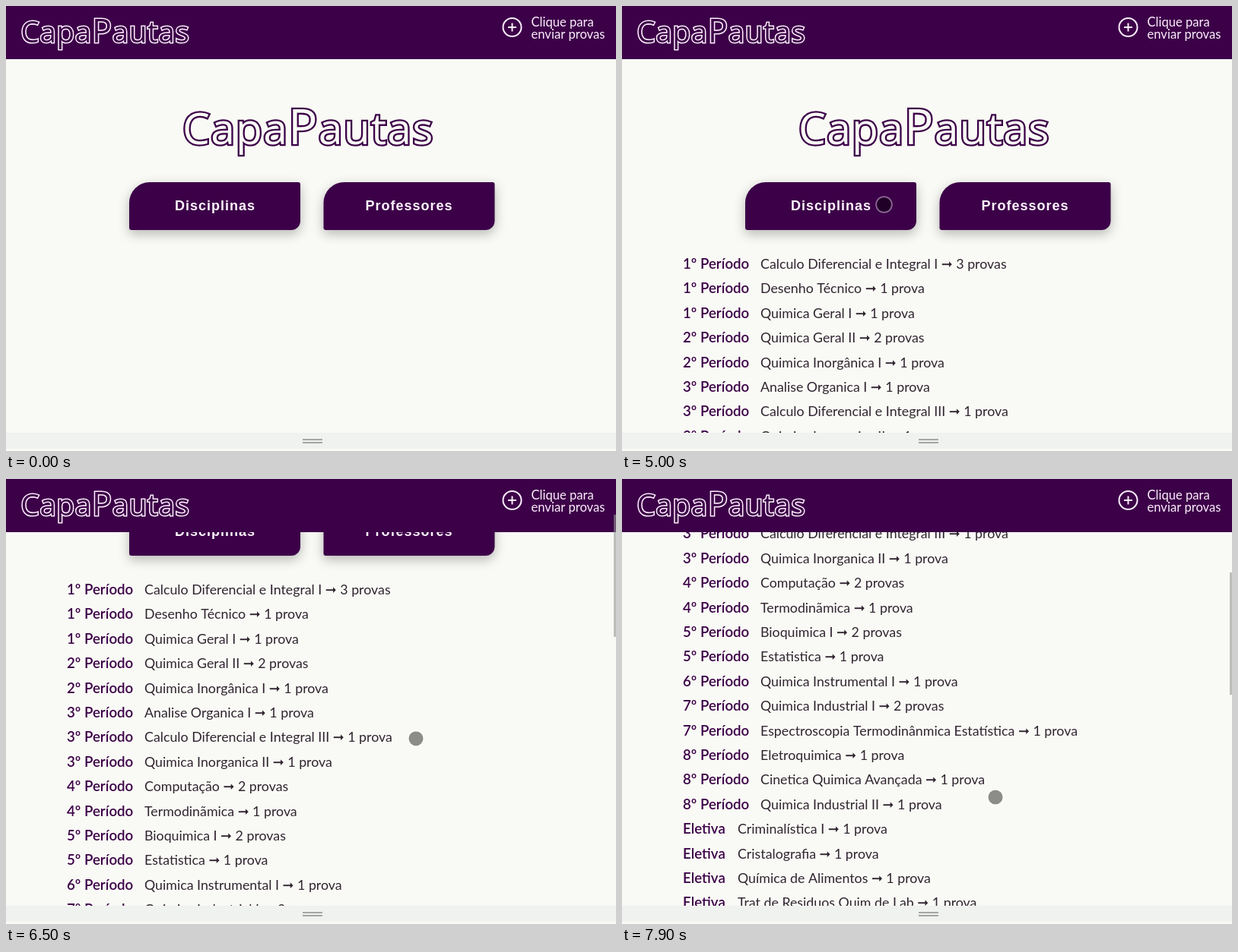
Recreate the animation shown at these times as an HTML page with a canvas. Size 802x586 px, loop 8000 ms.

```html
<!DOCTYPE html>
<html lang="pt-BR">
<head>
<meta charset="utf-8">
<title>CapaPautas</title>
<style>
html, body { margin: 0; width: 100%; height: 100%; overflow: hidden; background: #f9faf5; }
canvas { display: block; }
</style>
</head>
<body>
<canvas id="stage" width="802" height="586"></canvas>
<script>
const ctx = document.getElementById('stage').getContext('2d');
const PURPLE = '#3c0048', PAPER = '#f9faf5', PINK = '#fdeefd';
const LOOP = 8000, STEP = 100, ROW = 32.4;
const SANS = 'Lato, "DejaVu Sans", sans-serif';

// period (0 = elective) | subject | number of exams
const rows = `1|Calculo Diferencial e Integral I|3
1|Desenho Técnico|1
1|Quimica Geral I|1
2|Quimica Geral II|2
2|Quimica Inorgânica I|1
3|Analise Organica I|1
3|Calculo Diferencial e Integral III|1
3|Quimica Inorganica II|1
4|Computação|2
4|Termodinãmica|1
5|Bioquimica I|2
5|Estatistica|1
6|Quimica Instrumental I|1
7|Quimica Industrial I|2
7|Espectroscopia Termodinânmica Estatística|1
8|Eletroquimica|1
8|Cinetica Quimica Avançada|1
8|Quimica Industrial II|1
0|Criminalística I|1
0|Cristalografia|1
0|Química de Alimentos|1
0|Trat de Residuos Quim de Lab|1`.split('\n').map(line => {
  const [period, name, count] = line.split('|');
  return {
    label: +period ? period + 'º Período' : 'Eletiva',
    x: +period ? 182 : 152,
    text: `${name} ➞ ${count} prova${count > 1 ? 's' : ''}`
  };
});

// time, x, y
const pointer = [
  [800, 559, 162.5], [900, 559, 162.5], [1000, 520, 173], [1100, 468, 152],
  [1200, 502, 122], [1400, 502, 122], [1500, 503.5, 120.5], [1600, 503.5, 120.5],
  [1700, 420, 150], [1800, 324, 175], [1900, 324, 175], [2000, 290, 192],
  [2100, 282, 228], [2200, 310, 252], [2300, 310, 252], [2400, 325, 263],
  [2500, 344, 246], [2600, 335, 225], [2800, 339.5, 262.5], [4900, 339.5, 262.5],
  [5000, 344.5, 261.5], [5300, 603, 438], [5400, 603, 438], [6000, 557, 286],
  [6300, 547, 247], [6400, 547, 247], [6650, 527, 484], [6900, 518, 378],
  [7300, 512, 300], [7600, 500, 490], [7900, 491, 419]
];

// time, offset
const scrolling = [
  [5400, 0], [5500, 12], [5700, 66], [6000, 155], [6100, 175], [6300, 194],
  [6650, 194], [6900, 304], [7000, 346], [7100, 370], [7300, 384],
  [7600, 384], [7700, 402], [7900, 462]
];

function at(keys, t) {
  if (t <= keys[0][0]) return keys[0].slice(1);
  const i = keys.findIndex(k => k[0] >= t);
  if (i < 0) return keys[keys.length - 1].slice(1);
  const a = keys[i - 1], b = keys[i];
  const p = (t - a[0]) / (b[0] - a[0]);
  return a.slice(1).map((v, n) => v + (b[n + 1] - v) * p);
}

function write(text, x, y, font, color, spacing = 0) {
  ctx.font = font;
  ctx.letterSpacing = spacing + 'px';
  ctx.fillStyle = color;
  ctx.fillText(text, x, y);
}

function rect(x, y, w, h, color) {
  ctx.fillStyle = color;
  ctx.fillRect(x, y, w, h);
}

function logo(x, y, scale, ink, back) {
  ctx.save();
  ctx.translate(x, y);
  ctx.scale(scale, scale);
  ctx.letterSpacing = '1.2px';
  ctx.strokeStyle = ink;
  ctx.fillStyle = back;
  ctx.lineWidth = 4.6;
  ctx.lineJoin = 'miter';
  ctx.miterLimit = 2;
  let left = 0;
  for (const [text, size] of [['Capa', 57], ['P', 64], ['autas', 57]]) {
    ctx.font = `400 ${size}px "Open Sans", sans-serif`;
    ctx.strokeText(text, left, 0);
    ctx.fillText(text, left, 0);
    left += ctx.measureText(text).width;
  }
  ctx.restore();
}

function button(x, y, label, textX) {
  ctx.save();
  ctx.shadowColor = 'rgba(0,0,0,.27)';
  ctx.shadowBlur = 15;
  ctx.shadowOffsetY = 5;
  ctx.fillStyle = PURPLE;
  ctx.beginPath();
  ctx.roundRect(x, y, 225, 63, [27, 3, 12, 3]);
  ctx.fill();
  ctx.restore();
  write(label, textX, y + 37, 'bold 18px "Liberation Sans", Arial, sans-serif', '#fff5ff', 1);
}

function page(t, scroll) {
  ctx.save();
  ctx.translate(0, -scroll);
  logo(232, 182, 1, PURPLE, PAPER);
  button(162, 232, 'Disciplinas', 222);
  button(417.5, 232, 'Professores', 472.5);
  if (t >= 4300) {
    rows.forEach((row, i) => {
      const y = 346 + i * ROW;
      write(row.label, 80, y, '600 18.7px ' + SANS, PURPLE);
      write(row.text, row.x, y, '400 17.8px ' + SANS, '#302430');
    });
  } else if (t >= 3500) {
    write('Disciplinas do curso sem provas adicionadas:', 80, 367.5, 'bold 23.4px ' + SANS, PURPLE);
  }
  ctx.restore();
}

function header() {
  rect(0, 0, 802, 70, PURPLE);
  logo(19.5, 48, 0.672, PINK, PURPLE);
  ctx.strokeStyle = PINK;
  ctx.lineWidth = 2;
  ctx.beginPath();
  ctx.arc(665.5, 28, 12, 0, Math.PI * 2);
  ctx.moveTo(660, 28);
  ctx.lineTo(671, 28);
  ctx.moveTo(665.5, 22.5);
  ctx.lineTo(665.5, 33.5);
  ctx.stroke();
  write('Clique para', 690.5, 27, '400 16.6px ' + SANS, PINK);
  write('enviar provas', 690.5, 43, '400 16.6px ' + SANS, PINK);
}

function footer() {
  rect(0, 562, 802, 21, '#f0f2ef');
  rect(0, 583, 802, 3, PAPER);
  rect(390, 570, 26, 2, '#a4a6a4');
  rect(390, 574, 26, 2, '#a4a6a4');
}

function touch(x, y) {
  ctx.beginPath();
  ctx.arc(x, y, 9.6, 0, Math.PI * 2);
  ctx.fillStyle = 'rgba(0,0,0,.44)';
  ctx.fill();
  ctx.beginPath();
  ctx.arc(x, y, 10.4, 0, Math.PI * 2);
  ctx.strokeStyle = 'rgba(255,255,255,.4)';
  ctx.lineWidth = 1.8;
  ctx.stroke();
}

function draw(now) {
  const t = Math.floor((now % LOOP) / STEP) * STEP;
  const [scroll] = at(scrolling, t);
  rect(0, 0, 802, 586, PAPER);
  page(t, scroll);
  header();
  if (t >= 5500) rect(799, scroll * 0.2845 - 8.3, 3, 161, 'rgba(150,150,150,.6)');
  footer();
  if (t >= 800) touch(...at(pointer, t));
}

const start = performance.now();
function tick() {
  draw(performance.now() - start);
  requestAnimationFrame(tick);
}
tick();
</script>
</body>
</html>
```
